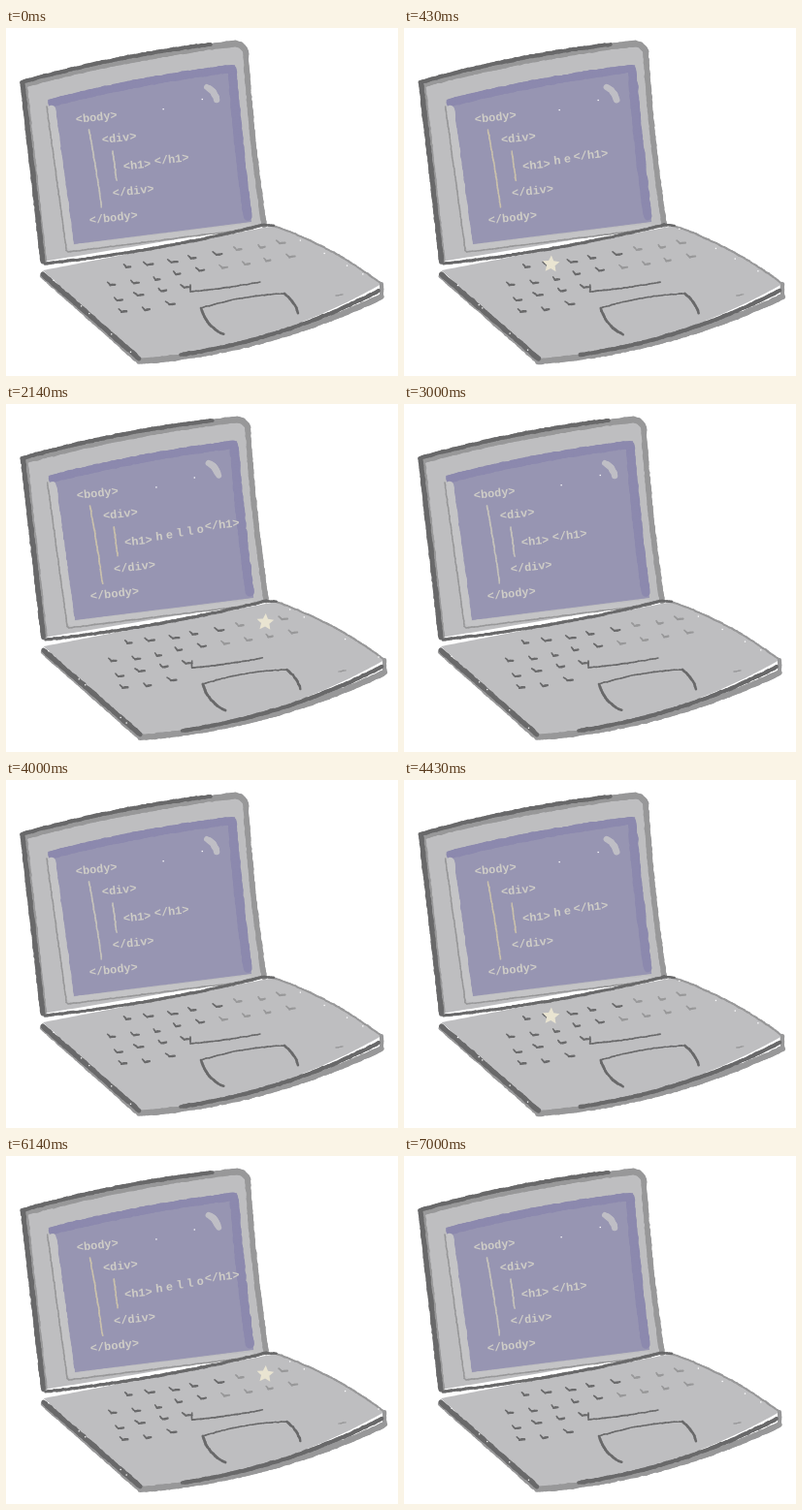
An HTML page with a canvas for the animation above (8000 ms loop, 404x359 px).

```html
<!DOCTYPE html>
<html lang="en">
<head>
<meta charset="utf-8">
<title>Typing on a sketched laptop</title>
<style>
html, body { margin: 0; width: 100%; height: 100%; overflow: hidden; background: #fff; }
canvas { display: block; }
</style>
</head>
<body>
<canvas id="stage" width="404" height="359"></canvas>
<script>
const ctx = document.getElementById('stage').getContext('2d');
const LIGHT = '#bebec0', MID = '#989899', DARK = '#69696a';
const BEVEL = '#c4c4c6', PURPLE = '#9795b2', EDGE = '#8c89ae', INK = '#cfcdc7';
const HALF = 4000;
const STEPS = [0, 140, 430, 860, 1430, 2140, 3000];
const WORD = 'hello';
const PRESSED = { h: [1, 4], e: [0, 2], l: [1, 6], o: [0, 7] };
const TILT = -0.11;

// Corners run clockwise from the top left
const LID = [[17, 57], [244, 16], [266, 203], [38, 241]];
const BASE = [[38, 250], [276, 204], [387, 264], [138, 343]];
const SCREEN = [[43, 74], [236, 38], [253, 200], [70, 223]];

let seed = 1;
function rnd() {
  seed = (seed * 16807) % 2147483647;
  return seed / 2147483647;
}
const jitter = a => (rnd() - 0.5) * 2 * a;
const shift = ([x, y], dx, dy) => [x + dx, y + dy];
const mix = (a, b, u) => [a[0] + (b[0] - a[0]) * u, a[1] + (b[1] - a[1]) * u];

// Points from a to b, bulging to the left of the direction by bow
function arc(a, b, bow = 0) {
  const dx = b[0] - a[0], dy = b[1] - a[1], len = Math.hypot(dx, dy);
  const count = Math.ceil(len / 3), out = [];
  for (let i = 0; i <= count; i++) {
    const u = i / count, k = 4 * bow * u * (1 - u) / len;
    out.push(shift(mix(a, b, u), dy * k, -dx * k));
  }
  return out;
}

function fill(points, color) {
  ctx.fillStyle = color;
  ctx.beginPath();
  for (const [x, y] of points) ctx.lineTo(x, y);
  ctx.fill();
}

// A closed shape whose four sides may bulge
function panel(corners, bows, color) {
  fill(corners.flatMap((c, i) => arc(c, corners[(i + 1) % 4], bows[i])), color);
}

// A chalky line whose width wanders
function line(a, b, color, w, bow = 0) {
  ctx.strokeStyle = color;
  ctx.lineCap = 'round';
  const points = arc(a, b, bow);
  let prev = points[0];
  for (const p of points.slice(1)) {
    const next = shift(p, jitter(0.3), jitter(0.3));
    ctx.lineWidth = w * (1 + jitter(0.1));
    ctx.beginPath();
    ctx.moveTo(...prev);
    ctx.lineTo(...next);
    ctx.stroke();
    prev = next;
  }
}

function label(text, x, y, align = 'left') {
  ctx.save();
  ctx.translate(x, y);
  ctx.rotate(TILT);
  ctx.font = 'bold 11.9px "Liberation Mono", monospace';
  ctx.textBaseline = 'middle';
  ctx.textAlign = align;
  ctx.fillStyle = INK;
  ctx.fillText(text, 0, 0);
  ctx.restore();
}

function star([x, y]) {
  const points = [];
  for (let i = 0; i < 10; i++) {
    const r = i % 2 ? 4.4 : 9.2, a = i * Math.PI / 5 - Math.PI / 2 + 0.05;
    points.push([x + r * Math.cos(a), y + r * Math.sin(a)]);
  }
  fill(points, '#e9e4d1');
}

function specks(a, b, count) {
  ctx.fillStyle = '#fff';
  for (let i = 0; i < count; i++) {
    const [x, y] = mix(a, b, (i + rnd()) / count);
    ctx.fillRect(x, y, 1.3, 1.3);
  }
}

const keyAt = (row, col) => [101 + 7 * row + 23 * col, 252 + 14 * row - 3.7 * col];

function keys() {
  const boil = seed;
  seed = 90210;
  [8, 8, 3, 2].forEach((last, row) => {
    for (let col = row ? 0 : 1; col <= last; col++) {
      const [x, y] = shift(keyAt(row, col), jitter(2), jitter(1.5));
      const size = 3 + rnd() * 2;
      const color = col + rnd() * 4 < 6 ? DARK : MID;
      line([x - size, y - 3], [x - 1, y], color, 1.6);
      line([x - 1, y], [x + size, y - 0.7], color, 2.2);
    }
  });
  seed = boil;
}

function trackpad() {
  const left = [201, 289], right = [287, 274];
  line(left, right, DARK, 1.5, 3);
  line(left, [224, 316], DARK, 2.6, -4);
  line(right, [301, 294], DARK, 2.6, 2);
}

function base() {
  const [back, hinge, side, front] = BASE;
  panel(BASE, [0, 5, 14, 0], LIGHT);
  line(hinge, side, MID, 2, 5);
  line(shift(back, -1, 6), shift(front, -3, 0), MID, 4);
  line(shift(front, -1, 1), shift(side, 0, 13), MID, 6, -12);
  line(side, shift(side, 0, 13), MID, 4);
  line([180, 337], shift(side, -3, 7), DARK, 4, -9);
  line(shift(back, 0, 4), shift(front, -1, -2), DARK, 5);
  keys();
  line([190, 265], [190, 272], DARK, 1.6);
  line([190, 272], [262, 262], DARK, 1.6, -1);
  trackpad();
  line([340, 276], [347, 275], MID, 1.3);
  specks(back, front, 5);
  specks(hinge, side, 4);
}

function lid() {
  const [tl, tr, br, bl] = LID;
  panel(LID, [4, -2, 0, 0], LIGHT);
  line(shift(tl, 2, 1), shift(tr, -8, 0), MID, 6.5, 4);
  line(shift(tr, -8, 0), shift(tr, 3, 8), MID, 6, 2);
  line(shift(tr, 3, 8), br, MID, 5.5, -2);
  line(shift(tl, 2, 0), shift(bl, 1, -2), MID, 5.5);
  line(tl, bl, DARK, 5);
  line(shift(tl, -1, -1), [211, 17], DARK, 4, 4);
}

function screen() {
  const [tl, tr, br, bl] = SCREEN;
  panel(SCREEN, [3, -1, 0, 0], PURPLE);
  line(shift(tl, 4, 3), shift(tr, -4, 4), EDGE, 8, 3);
  line(shift(tr, -3, 5), shift(br, -4, -6), EDGE, 9, -1);
  line(shift(tl, 4, 10), shift(bl, -4, 1), BEVEL, 8);
  line(shift(bl, -2, 4), shift(br, -3, 5), BEVEL, 6);
  const corner = shift(bl, -6, 8);
  line(shift(tl, -1, 7), shift(corner, -2, -4), MID, 1.5);
  line(shift(corner, -2, -4), corner, MID, 1.5, -1);
  line(corner, shift(br, 2, 7), MID, 1.5);
  line([207, 61], [217, 74], '#bfbec5', 6.5, 2);
  specks([138, 89], [205, 72], 2);
}

function code(n) {
  const tint = n ? '#c9c0ac' : '#c5c2bb';
  label('<body>', 72, 95);
  label('<div>', 99, 116);
  label('<h1>', 121, 143.5);
  label('</h1>', 153 + 10 * n, 138 - 2.2 * n);
  label('</div>', 110, 171);
  label('</body>', 86, 199);
  for (let i = 0; i < n; i++) label(WORD[i], 156.5 + 10.5 * i, 137.5 - 1.9 * i, 'center');
  line([85.5, 105], [98.5, 185], tint, 1.6, 0.5);
  line([110, 127], [114, 157], tint, 1.6);
}

function draw(now) {
  const part = now % HALF;
  const n = (STEPS.filter(s => part >= s).length - 1) % 6;
  seed = 4211 + n * 977;

  ctx.setTransform(1, 0, 0, 1, 0, 0);
  ctx.fillStyle = '#fff';
  ctx.fillRect(0, 0, 404, 359);
  // The drawing leans right while typing
  if (n) ctx.setTransform(1.007, 0, 0, 1, 0.4, 0);
  base();
  lid();
  screen();
  line(shift(LID[3], 2, 2), LID[2], DARK, 3, -4);
  line(LID[2], BASE[1], DARK, 2.5);
  code(n);
  if (n) star(shift(keyAt(...PRESSED[WORD[n - 1]]), 3, -1));
}

const start = performance.now();
function tick() {
  draw(performance.now() - start);
  requestAnimationFrame(tick);
}
tick();
</script>
</body>
</html>
```
